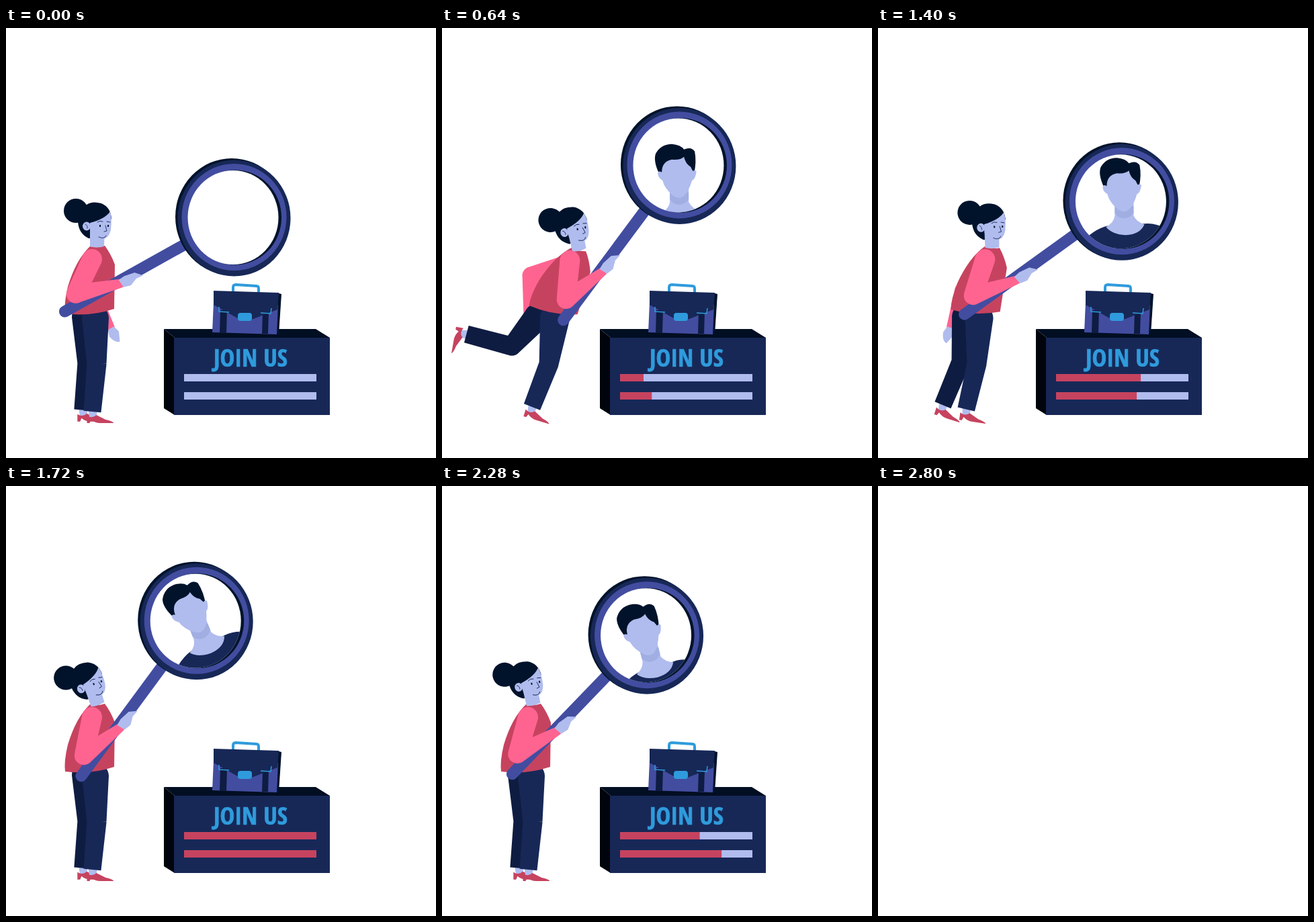
Write an HTML page that moves like this. It is 640 by 640 pixels and loops after 2.84 s.

```html
<!DOCTYPE html>
<html lang="en">
<head>
<meta charset="utf-8">
<title>Join us</title>
<style>
  html, body { margin: 0; width: 100%; height: 100%; overflow: hidden; background: #fff; }
  svg { display: block; width: 100vw; height: 100vh; }
  text { font-family: "Open Sans Condensed", "Roboto Condensed", "Noto Sans", sans-serif; font-weight: 300; font-stretch: extra-condensed; }
  .ink { fill: #00132b; }
  .navy { fill: #172857; }
  .shade { fill: #0f1c42; }
  .blue { fill: #424da0; }
  .pink { fill: #ff6490; }
  .red { fill: #c6435f; }
  .skin { fill: #b0bcee; }
  .sky { fill: #2f9bdc; }
  .line { fill: none; stroke: #172857; stroke-width: .9; stroke-linecap: round; }
  .trim { fill: none; stroke: #2f9bdc; }
</style>
</head>
<body>
<svg viewBox="0 0 640 640">
  <defs>
    <clipPath id="lensClip"><ellipse rx="67.5" ry="70"/></clipPath>
    <g id="shoe">
      <path class="skin" d="M-6-2H7L6 10-4 11Z"/>
      <path class="red" d="M-8 6V17H-4L-2 12Q4 17 12 17H32Q30 14 20 12L6 5Q0 11-8 6Z"/>
    </g>
  </defs>
  <g id="scene">
    <!-- sign -->
    <path fill="#00040c" d="M235 448 251 461V576L235 566Z"/>
    <path fill="#020e22" d="M235 448H461L482 461H251Z"/>
    <path class="navy" d="M250 461H482V576H250Z"/>
    <text id="label" class="sky" x="364" y="504" font-size="42" text-anchor="middle" stroke="#2f9bdc" stroke-width=".7">JOIN US</text>
    <path class="skin" d="M265 515h197v11H265ZM265 542h197v11H265Z"/>
    <rect id="bar1" class="red" x="265" y="515" height="11"/>
    <rect id="bar2" class="red" x="265" y="542" height="11"/>

    <!-- briefcase -->
    <path class="trim" stroke-width="4" d="M338 394V386Q338 382 342 382L373 384Q376 384 376 388V396"/>
    <path class="ink" d="M403 394 410 396 406 456H400Z"/>
    <path class="blue" d="M309 408 405 412 403 456 307 453Z"/>
    <path class="shade" d="M319 420h10l-1 34h-10ZM382 422h9l-1 33h-9Z"/>
    <path class="navy" d="M309 391 406 394 404 419 368 433Q356 438 343 431L309 412Z"/>
    <path class="trim" stroke-width="1.5" d="M317 415V422L332 423M379 424 394 425 395 417"/>
    <rect class="sky" x="345" y="424" width="21" height="12" rx="4"/>

    <!-- woman -->
    <path id="backSleeve" class="pink"/>
    <path id="backHand" class="skin" d="M0-5 10-8 24-2Q22 6 10 8L0 5Z"/>
    <use id="backShoe" href="#shoe"/>
    <path id="backLeg" class="shade"/>
    <use id="frontShoe" href="#shoe"/>
    <path id="frontLeg" class="navy"/>
    <path id="torso" class="red" d="M125 325Q136 328 147 324 156 336 162 352L161 418Q125 430 88 425 86 410 92 385 104 345 125 325Z"/>
    <g id="head">
      <circle class="ink" cx="104" cy="272" r="18"/>
      <path class="ink" d="M107 288Q108 266 120 263 128 257 142 261 156 267 157 284L128 313H123Q108 306 107 288Z"/>
      <path class="skin" d="M125 298H147L146 325Q136 328 125 325Z"/>
      <path class="skin" d="M125 290Q148 284 155 273 158 284 156 300 153 314 143 314 130 313 125 303Z"/>
      <ellipse class="skin" cx="120" cy="295" rx="6" ry="6.5"/>
      <path class="line" d="M118 292Q122 294 121 298M136 289Q140 286 144 288M150 288 155 289M148 294 150 302 146 303M138 311Q146 315 149 309"/>
      <path class="ink" d="M139 293h2v3h-2ZM151 293h2v3h-2Z"/>
    </g>

    <!-- magnifier -->
    <path id="handle" fill="none" stroke="#424da0" stroke-width="17" stroke-linecap="round" d="M0 0H206"/>
    <g id="lens">
      <ellipse class="ink" cx="-2" cy="-1" rx="84" ry="87"/>
      <ellipse class="navy" cx="1.5" cy="1" rx="84" ry="86.5"/>
      <ellipse class="blue" cx="1.5" cy="-.5" rx="78" ry="79.5"/>
      <ellipse class="ink" cx="3" rx="69" ry="70.5"/>
      <ellipse fill="#fff" rx="67.5" ry="70"/>
      <g clip-path="url(#lensClip)">
        <g id="man">
          <path class="navy" d="M290 275Q310 252 332 247L386 244Q402 242 420 252V310H290Z"/>
          <path class="skin" d="M342 210H370V232Q374 241 386 245 380 260 358 261 338 260 329 249 341 242 342 232Z"/>
          <path fill="#a0aee2" d="M342 218H370V228Q364 237 354 236 346 235 342 228Z"/>
          <path class="ink" d="M326 190Q317 171 321 160 329 146 345 146 358 147 363 154 374 149 379 157 382 172 378 190Z"/>
          <path class="skin" d="M330 188Q330 172 345 169 358 170 363 165 365 175 373 180L376 186Q383 183 381 190 379 199 375 200 370 217 362 224 354 229 346 222 334 212 331 200 324 196 324 189 325 185 330 188Z"/>
        </g>
      </g>
    </g>
    <path id="frontSleeve" class="pink"/>
    <path id="frontHand" class="skin" d="M93-2 103-3 119 0 128 10 117 9 105 14 94 11Z"/>
  </g>
</svg>
<script>
const LOOP = 2840, STEP = 40, BLANK_FROM = 2800;
const REST_ANGLE = 29.2, REACH = 287;
const HIP = [124, 422], NECK = [136, 322], SHOULDER = [128, 344];

const el = {};
document.querySelectorAll('[id]').forEach(node => el[node.id] = node);
const set = (node, name, value) => node.setAttribute(name, value);
const move = (node, value) => set(node, 'transform', value);

const mix = (a, b, u) => a + (b - a) * u;
const ramp = (t, from, to) => Math.min(1, Math.max(0, (t - from) / (to - from)));
const ease = (t, from, to) => {
  const u = ramp(t, from, to);
  return u * u * (3 - 2 * u);
};

// Body lean from 0 to 1, and degrees the magnifier is raised.
const lean = t => ease(t, 0, 640) - ease(t, 1080, 1720);
const lift = t => 24.4 * (ease(t, 0, 680) - ease(t, 1880, 2960))
  - 18 * (ease(t, 960, 1380) - ease(t, 1380, 1720));
// Bars fill in two goes, then drain.
const bar = (t, first, resume, drain) => 197 * (first * ramp(t, 400, 900)
  + (1 - first) * ramp(t, resume, 1720) - drain * ramp(t, 1910, 2840));

function rotated([x, y], degrees) {
  const a = degrees * Math.PI / 180, c = Math.cos(a), s = Math.sin(a);
  return [x * c - y * s, x * s + y * c];
}

// End of a bone that hangs from a joint and swings backwards.
function hang([x, y], length, degrees) {
  const [dx, dy] = rotated([0, length], degrees);
  return [x + dx, y + dy];
}

// Tapered outline through joints; a cuffed limb ends flat.
function limb(joints, radii, cuffed) {
  let d = '';
  joints.forEach(([x, y], i) => {
    const r = radii[i];
    if (!cuffed || i < joints.length - 1) {
      d += `M${x - r} ${y}a${r} ${r} 0 1 0 ${2 * r} 0a${r} ${r} 0 1 0 ${-2 * r} 0Z`;
    }
    if (!i) return;
    const [px, py] = joints[i - 1], s = radii[i - 1];
    const length = Math.hypot(x - px, y - py);
    const nx = (py - y) / length, ny = (x - px) / length;
    d += `M${px + nx * s} ${py + ny * s}L${x + nx * r} ${y + ny * r}`
      + `L${x - nx * r} ${y - ny * r}L${px - nx * s} ${py - ny * s}Z`;
  });
  return d;
}

function drawLegs(p) {
  const hip = [133 + 35 * p, 432];
  const knee = [135 + 24 * p, 500], ankle = [128.5 + 5.5 * p, 571 - 7 * p];
  set(el.frontLeg, 'd', limb([hip, knee, ankle], [20 + 2 * p, 14.5, 13], true));
  move(el.frontShoe, `translate(${ankle}) rotate(${17 * p})`);

  const kick = p ** 2.5, shin = 5 + 100 * kick;
  const backHip = [118 + 24 * p, 430];
  const backKnee = hang(backHip, mix(69, 58, kick), 43 * kick - 2);
  const backAnkle = hang(backKnee, 70, shin);
  set(el.backLeg, 'd', limb([backHip, backKnee, backAnkle], [20, 14, 13], true));
  move(el.backShoe, `translate(${backAnkle}) rotate(${shin - 5})`);
}

function drawBackArm(t, p, shoulder) {
  const swing = 68 * ease(t, 400, 880) - 50 * ease(t, 1160, 1720) - 29;
  const elbow = hang(shoulder, 52 + 10 * p, 69 * p);
  const wrist = hang(elbow, 58, swing);
  set(el.backSleeve, 'd', limb([shoulder, elbow, wrist], [10, 13, 6]));
  move(el.backHand, `translate(${wrist}) rotate(${swing + 90})`);
}

function drawMagnifier(p, raise, shoulder) {
  const angle = -(REST_ANGLE + raise);
  const base = [87.5 + raise + 69 * p, 422 + .4 * raise + 3 * p];
  const onHandle = point => {
    const [x, y] = rotated(point, angle);
    return [x + base[0], y + base[1]];
  };
  for (const part of [el.handle, el.frontHand]) move(part, `translate(${base}) rotate(${angle})`);
  move(el.lens, `translate(${onHandle([REACH, 0])})`);
  set(el.frontSleeve, 'd', limb([shoulder, onHandle([27, -15]), onHandle([93, 4])], [15, 14, 6.5]));
}

function drawMan(t) {
  const below = 1 - ease(t, 260, 800);
  const tilt = ease(t, 1400, 1720) - ease(t, 2040, 2640);
  const x = 12 * tilt - 18 * below;
  const y = 130 * below - 6 * ease(t, 920, 1400) + 104 * ease(t, 2080, 2960);
  move(el.man, `translate(${x - 351} ${y - 205}) rotate(${-22 * tilt} 355 250)`);
}

function draw(t) {
  const p = lean(t), raise = lift(t);
  const shift = [41 * p, -2 * p], turn = 16 * p;
  const onTorso = point => {
    const [x, y] = rotated([point[0] - HIP[0], point[1] - HIP[1]], turn);
    return [x + HIP[0] + shift[0], y + HIP[1] + shift[1]];
  };
  const shoulder = onTorso(SHOULDER);

  set(el.scene, 'visibility', t < BLANK_FROM ? 'visible' : 'hidden');
  set(el.bar1, 'width', bar(t, .37, 1160, 1));
  set(el.bar2, 'width', bar(t, .5, 1310, .585));
  move(el.torso, `translate(${shift}) rotate(${turn} ${HIP})`);
  move(el.head, `translate(${onTorso(NECK)}) rotate(${6 * p - .8 * raise}) translate(${-NECK[0]} ${-NECK[1]})`);
  drawLegs(p);
  drawBackArm(t, p, shoulder);
  drawMagnifier(p, raise, shoulder);
  drawMan(t);
}

// Smaller type when only a wide face is available.
set(el.label, 'font-size', Math.min(42, 42 * 110 / el.label.getComputedTextLength()));

function tick() {
  draw(Math.floor(performance.now() % LOOP / STEP) * STEP);
  requestAnimationFrame(tick);
}
tick();
</script>
</body>
</html>
```
